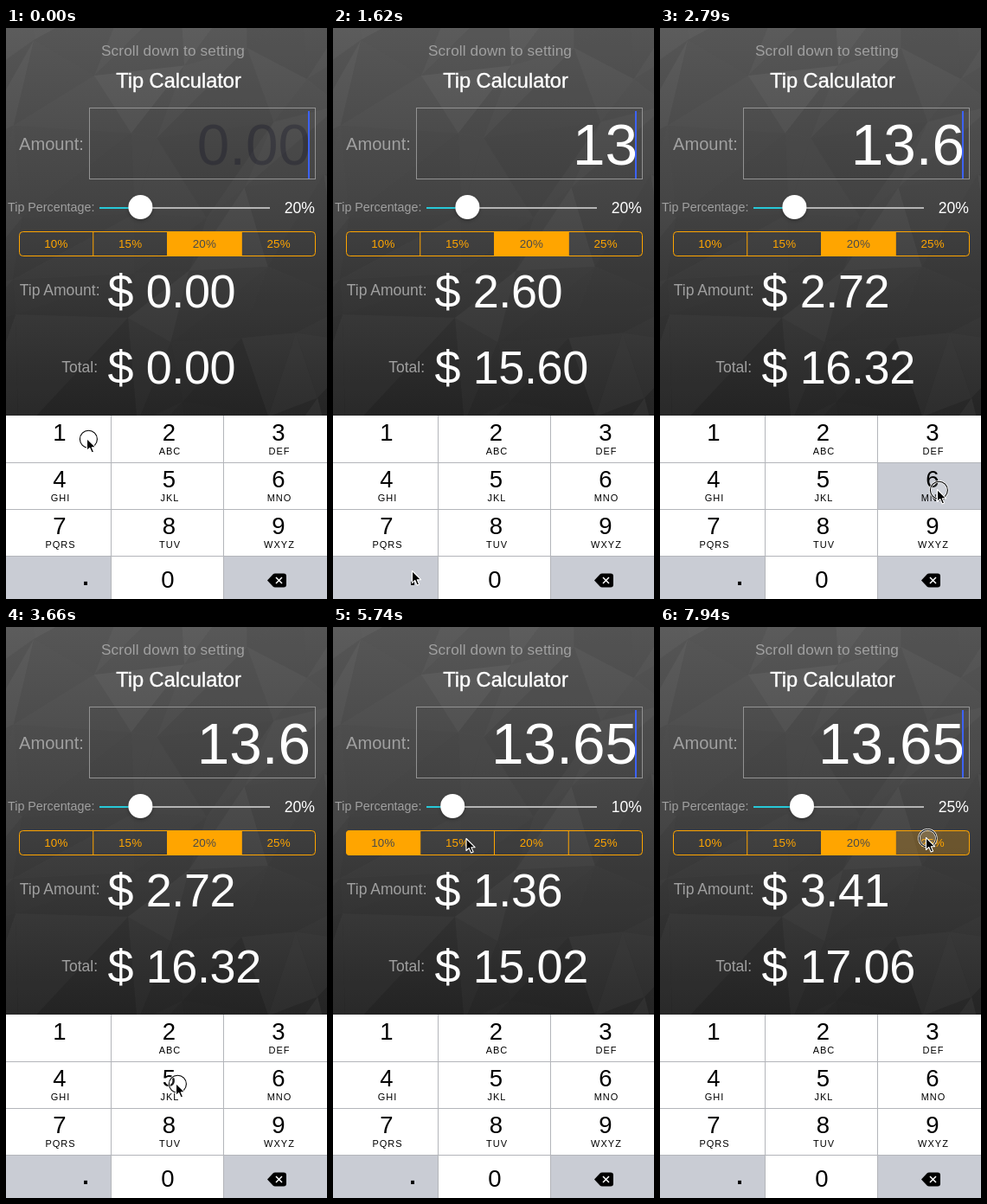
Animation, 371 px wide and 660 px high, one loop 8 s. Source, as an HTML page:

```html
<!DOCTYPE html>
<html lang="en">
<head>
<meta charset="utf-8">
<title>Tip Calculator</title>
<style>
  html, body { margin: 0; width: 100%; height: 100%; overflow: hidden; background: #333; }
  svg { display: block; width: 371px; height: 660px; }
  text { font-family: "Liberation Sans", Arial, sans-serif; white-space: pre; }
  .label { fill: #a0a0a0; }
  .white { fill: #fff; }
  .mid { text-anchor: middle; }
  .end { text-anchor: end; }
</style>
</head>
<body>
<svg id="stage" viewBox="0 0 371 660">
  <defs>
    <linearGradient id="dusk" x1="0" y1="0" x2="0" y2="1">
      <stop offset="0" stop-color="#5a5a5a"/>
      <stop offset=".5" stop-color="#444"/>
      <stop offset="1" stop-color="#262626"/>
    </linearGradient>
    <filter id="soft" x="-50%" y="-50%" width="200%" height="200%">
      <feGaussianBlur stdDeviation="2"/>
    </filter>
    <clipPath id="pill"><rect x="15" y="235" width="343" height="29" rx="4"/></clipPath>
    <clipPath id="upper"><rect width="371" height="448"/></clipPath>
  </defs>
</svg>
<script>
const stage = document.getElementById('stage');
const LOOP = 8000, STEP = 147.05, LAST = 54;
const ORANGE = '#ffa500', GRAY = '#c9ccd4', RULE = '#b3b5ba';
const COLS = [0, 121.5, 251.5, 371];
const RATES = [10, 15, 20, 25];
const rowY = row => row ? 448.5 + row * 54 : 448;
const segX = i => 15 + i * 85.75;

function set(el, attrs) {
  for (const name in attrs) el.setAttribute(name, attrs[name]);
}
function add(tag, attrs, parent = stage) {
  const el = document.createElementNS('http://www.w3.org/2000/svg', tag);
  set(el, attrs);
  return parent.appendChild(el);
}
function label(x, y, size, cls, text, extra = {}) {
  const el = add('text', { x, y, 'font-size': size, class: cls, ...extra });
  el.textContent = text;
  return el;
}
function line(x1, y1, x2, y2, stroke, width = 1) {
  return add('line', { x1, y1, x2, y2, stroke, 'stroke-width': width });
}

// Backdrop: a gradient under a jittered mesh of faint triangles
let seed = 11;
function random() {
  seed = (seed * 16807) % 2147483647;
  return seed / 2147483647;
}
function facets(size) {
  const mesh = add('g', { 'clip-path': 'url(#upper)' });
  const jitter = () => (random() - .5) * size * .8;
  const grid = Array.from({ length: 8 }, (_, r) => Array.from({ length: 7 }, (_, c) =>
    [(c - .5) * size + jitter(), (r - .5) * size + jitter()]));
  for (let r = 0; r < 7; r++) {
    for (let c = 0; c < 6; c++) {
      const a = grid[r][c], b = grid[r][c + 1], d = grid[r + 1][c], e = grid[r + 1][c + 1];
      for (const points of [[a, b, d], [b, d, e]]) {
        const shade = random() * .11 - .075;
        add('polygon', { points: points.join(' '), fill: shade > 0 ? '#fff' : '#000', opacity: Math.abs(shade) }, mesh);
      }
    }
  }
}
add('rect', { width: 371, height: 448, fill: 'url(#dusk)' });
facets(80);

// Headings and amount field
label(110, 32, 17.2, 'label', 'Scroll down to setting', { 'letter-spacing': .12 });
label(199.5, 68.5, 23.6, 'white mid', 'Tip Calculator', { stroke: '#fff', 'stroke-width': .4 });
label(15, 141, 20.1, 'label', 'Amount:');
add('rect', { x: 96.5, y: 92.5, width: 261, height: 82, fill: '#000', 'fill-opacity': .04, stroke: '#929292' });
const amount = label(352, 157.8, 67.5, 'end', '');
const caret = add('rect', { x: 349, y: 96, width: 2, height: 78, fill: '#3c62f5' });

// Slider
label(2, 212, 14.3, 'label', 'Tip Percentage:');
line(108, 208, 305, 208, '#b4b4b4', 2);
const filled = line(108, 208, 155, 208, '#27c9d8', 2);
const thumb = add('g', {});
add('circle', { cy: 209, r: 13.5, fill: '#000', opacity: .3, filter: 'url(#soft)' }, thumb);
add('circle', { cy: 207, r: 14, fill: '#fff' }, thumb);
const percent = label(357, 214, 17.6, 'white end', '');

// Segmented control
const segs = RATES.map((rate, i) => {
  const x = segX(i), width = segX(1) - segX(0);
  const box = add('rect', { x, y: 235, width, height: 29, fill: ORANGE, 'clip-path': 'url(#pill)' });
  const text = label(x + width / 2, 254, 13.4, 'mid', rate + '%', { 'letter-spacing': .2 });
  return { rate, box, text };
});
add('rect', { x: 15.5, y: 235.5, width: 342, height: 28, rx: 4, fill: 'none', stroke: ORANGE });
for (let i = 1; i < RATES.length; i++) line(segX(i), 235, segX(i), 264, ORANGE);

// Results
label(108.5, 309, 17.5, 'label end', 'Tip Amount:');
label(106, 398, 17.5, 'label end', 'Total:');
const [tipText, totalText] = [322.6, 410.6].map(y =>
  label(117.5, y, 54, 'white', '', { 'letter-spacing': -.4 }));

// Keypad
add('rect', { y: 448, width: 371, height: 212, fill: '#fff' });
function cell(col, row) {
  return add('rect', {
    x: COLS[col], y: rowY(row), fill: GRAY, width: COLS[col + 1] - COLS[col], height: 54
  });
}
cell(0, 3);
cell(2, 3);
const letters = ['', 'ABC', 'DEF', 'GHI', 'JKL', 'MNO', 'PQRS', 'TUV', 'WXYZ'];
const keys = letters.map((word, i) => {
  const col = i % 3, row = Math.floor(i / 3), x = 62 + col * 126.5, y = 477 + row * 54;
  const back = cell(col, row);
  label(x, y, 27.5, 'mid', i + 1);
  label(x + 1, y + 16, 11, 'mid', word, { 'letter-spacing': 1 });
  return back;
});
label(187, 647, 27.5, 'mid', '0');
label(92, 644, 27.5, 'mid', '.', { 'font-weight': 'bold' });
for (let row = 1; row < 4; row++) line(0, rowY(row), 371, rowY(row), RULE);
for (const x of COLS.slice(1, 3)) line(x, 448, x, 660, RULE);
add('path', { d: 'M302 638.5 L308.5 631.5 Q309.5 630.5 311 630.5 H321 Q324 630.5 324 633.5 V643.5 Q324 646.5 321 646.5 H311 Q309.5 646.5 308.5 645.5 Z' });
add('path', { d: 'M312 635 l7 7 m0 -7 l-7 7', stroke: '#fff', 'stroke-width': 1.5 });

// Pointer with its press ring
const pointer = add('g', {});
const ring = add('g', { transform: 'translate(2.4 1.2)' }, pointer);
add('circle', { r: 10, fill: '#fff', 'fill-opacity': .12, stroke: '#fff', 'stroke-width': 2.4 }, ring);
add('circle', { r: 10, fill: 'none', stroke: '#000', 'stroke-width': 1.1 }, ring);
add('path', {
  d: 'M.5 .5 V14.5 L3.8 11.5 L6.2 17 L8.6 16 L6.3 10.7 H10.6 Z',
  stroke: '#fff', 'stroke-width': 1.1, 'stroke-linejoin': 'round'
}, pointer);

// The whole story: a string types a key, a number picks a rate
const tap = (at, what, x, y) => ({ at, what, x, y });
const taps = [
  tap(0, '1', 93, 474), tap(7, '3', 318, 478), tap(12, '.', 91, 627),
  tap(18, '6', 320, 533), tap(24, '5', 196, 527),
  tap(35, 10, 67, 249), tap(41, 15, 153.5, 244), tap(46, 20, 221, 244), tap(54, 25, 307, 243)
];
const typing = taps.filter(t => typeof t.what === 'string');
const picking = taps.filter(t => typeof t.what === 'number');
const clamp = v => Math.max(0, Math.min(1, v));

// Leaves right after a tap and rests at the next place until it is tapped
function pointerAt(step) {
  const i = taps.findLastIndex(t => t.at <= step);
  const from = taps[i], to = taps[i + 1] || from;
  const dx = to.x - from.x, dy = to.y - from.y, leave = from.at + 1;
  const travel = Math.min(6, Math.ceil(Math.hypot(dx, dy) / 30), to.at - 1 - leave);
  const ease = travel > 0 ? 1 - (1 - clamp((step - leave) / travel)) ** 3 : 0;
  return [from.x + dx * ease, from.y + dy * ease];
}

// Blinks once a second, starting solid after each key
function caretAlpha(ms) {
  const p = ms % 1000;
  return Math.max(clamp((670 - p) / 170), clamp((p - 880) / 90));
}

function draw(ms) {
  const step = Math.min(LAST, Math.floor(ms / STEP + .06));
  const typed = typing.filter(t => t.at < step), lastKey = typed[typed.length - 1];
  const text = typed.map(t => t.what).join('');
  const rate = picking.reduce((r, t) => t.at <= step ? t.what : r, 20);
  const active = picking.reduce((r, t) => t.at < step ? t.what : r, 20);
  const bill = Number(text), tip = bill * rate / 100;

  amount.textContent = text || '0.00';
  set(amount, text ? { fill: '#fff', 'fill-opacity': 1 } : { fill: '#000019', 'fill-opacity': .24 });
  set(caret, { opacity: caretAlpha((step - (lastKey ? lastKey.at + 1 : 0)) * STEP) });

  const x = 121 + rate * 1.72;
  set(filled, { x2: x });
  set(thumb, { transform: `translate(${x} 0)` });
  percent.textContent = rate + '%';

  // Half cents round down in the tip and up in the total
  tipText.textContent = '$ ' + Math.max(0, tip - 1e-6).toFixed(2);
  totalText.textContent = '$ ' + (bill + tip + 1e-6).toFixed(2);

  for (const seg of segs) {
    const on = seg.rate === active, down = seg.rate === rate;
    set(seg.box, { 'fill-opacity': on ? 1 : down ? .24 : 0 });
    set(seg.text, { fill: on ? '#4a4a4a' : ORANGE });
  }
  const held = lastKey && lastKey.at + 1 === step ? Number(lastKey.what) : 0;
  keys.forEach((key, i) => set(key, { fill: i + 1 === held ? GRAY : '#fff' }));

  set(pointer, { transform: `translate(${pointerAt(step).join(' ')})` });
  set(ring, { opacity: taps.some(t => t.at === step || t.at + 1 === step) ? 1 : 0 });
}

const start = performance.now();
function tick() {
  draw((performance.now() - start) % LOOP);
  requestAnimationFrame(tick);
}
tick();
</script>
</body>
</html>
```
